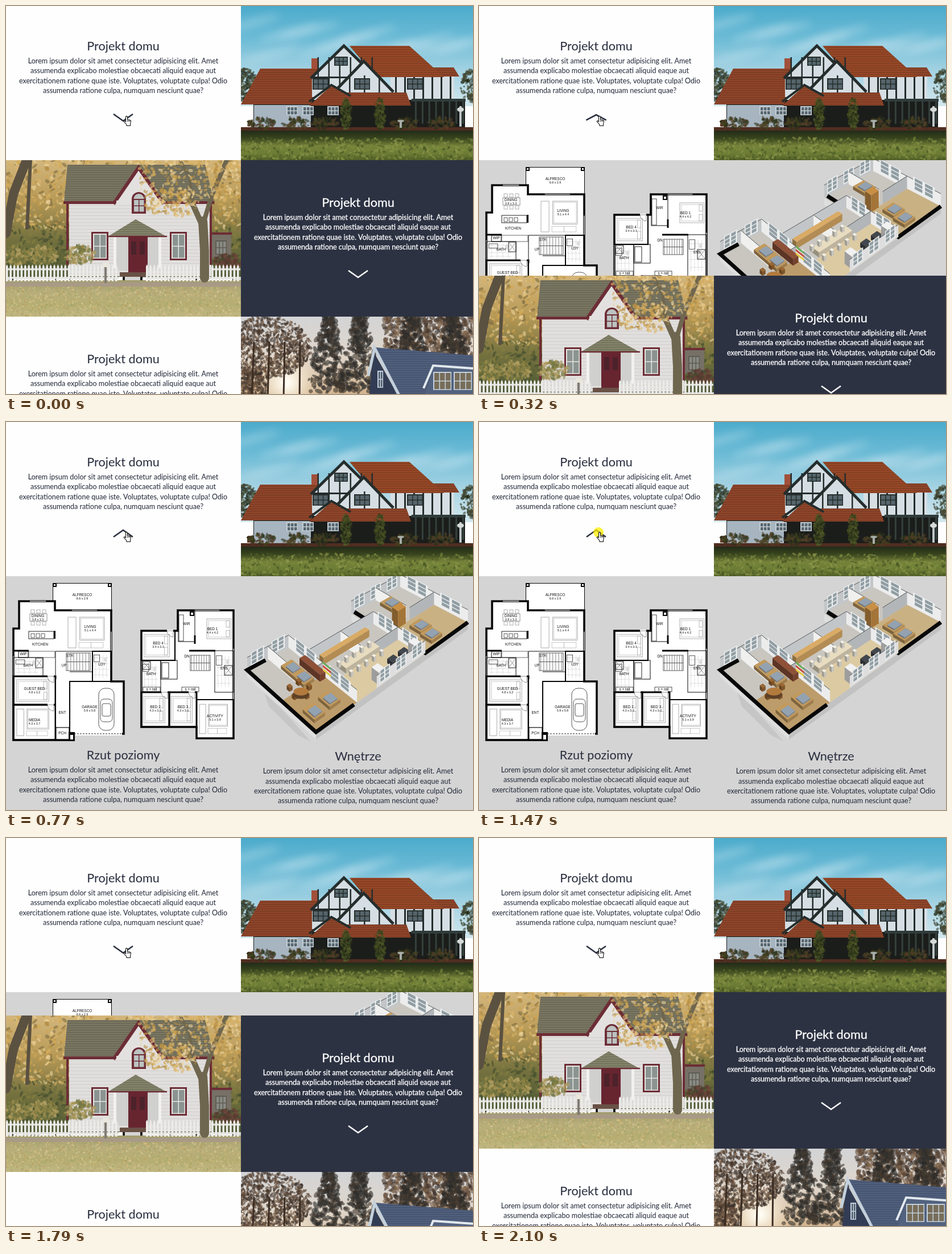
Write an HTML page with a canvas that moves like this. It is 821 by 682 pixels and loops after 2250 ms.

```html
<!DOCTYPE html>
<html lang="pl">
<head>
<meta charset="utf-8">
<title>Projekt domu</title>
<style>
html, body { margin: 0; width: 100%; height: 100%; overflow: hidden; background: #fefefe; }
canvas { display: block; }
</style>
</head>
<body>
<canvas id="stage" width="821" height="682"></canvas>
<script>
const W = 821, SPLIT = 413, TOP = 271, ROW = 275, PANEL = 420;
const INK = '#2b3040', NAVY = '#2c3242', GREY = '#d4d4d4', PAPER = '#fefefe', BLACK = '#080808';
const stage = document.getElementById('stage').getContext('2d');
let g = stage;

// ---- helpers ----
let seed = 7;
const rnd = () => (seed = (seed * 16807) % 2147483647) / 2147483647;
const mix = (a, b, k) => a + (b - a) * k;
const times = (n, f) => { for (let i = 0; i < n; i++) f(i, (i + 0.5) / n); };
const rect = (c, x, y, w, h) => { g.fillStyle = c; g.fillRect(x, y, w, h); };
function trace(p) {
  g.beginPath();
  for (let i = 0; i < p.length; i += 2) g.lineTo(p[i], p[i + 1]);
}
function poly(c, ...p) { trace(p); g.closePath(); g.fillStyle = c; g.fill(); }
function line(c, w, ...p) { trace(p); g.strokeStyle = c; g.lineWidth = w; g.stroke(); }
function box(c, x, y, w, h, lw = 0.8) { g.strokeStyle = c; g.lineWidth = lw; g.strokeRect(x, y, w, h); }
function oval(c, x, y, rx, ry, a = 0) {
  g.beginPath(); g.ellipse(x, y, rx, ry, a, 0, 7); g.fillStyle = c; g.fill();
}
function fade(x, y, w, h, ...stops) {
  const f = g.createLinearGradient(0, y, 0, y + h);
  stops.forEach((c, i) => f.addColorStop(i / (stops.length - 1), c));
  rect(f, x, y, w, h);
}
function within(p, draw) { g.save(); trace(p); g.closePath(); g.clip(); draw(); g.restore(); }

// soft specks spread over a box, or over an oval around a point
function dabs(n, x, y, w, h, size, ...colors) {
  g.globalAlpha = 0.6;
  times(n, i => oval(colors[i % colors.length], x + rnd() * w, y + rnd() * h, size * (0.4 + rnd()), size * (0.3 + rnd() * 0.5), rnd() * 3));
  g.globalAlpha = 1;
}
function clump(n, x, y, rx, ry, size, ...colors) {
  times(n, i => {
    const a = rnd() * 6.3, r = Math.sqrt(rnd());
    dabs(1, x + Math.cos(a) * r * rx, y + Math.sin(a) * r * ry, 0, 0, size, colors[i % colors.length]);
  });
}
function layer(y, h, draw) {
  const c = document.createElement('canvas');
  c.width = W; c.height = h;
  g = c.getContext('2d');
  g.translate(0, -y);
  draw();
  g = stage;
  return c;
}
const photo = (x, y, w, draw) => within([x, y, x + w, y, x + w, y + ROW, x, y + ROW], draw);

// ---- text ----
const LOREM = [
  'Lorem ipsum dolor sit amet consectetur adipisicing elit. Amet',
  'assumenda explicabo molestiae obcaecati aliquid eaque aut',
  'exercitationem ratione quae iste. Voluptates, voluptate culpa! Odio',
  'assumenda ratione culpa, numquam nesciunt quae?'
];
function copy(x, y, title, color, weight = 0.05) {
  g.fillStyle = g.strokeStyle = color;
  g.textAlign = 'center';
  const put = (s, ty) => { g.fillText(s, x, ty); g.lineWidth = weight; g.strokeText(s, x, ty); };
  g.font = '21.6px Lato, "Open Sans", sans-serif';
  put(title, y);
  g.font = '12.55px Lato, "Open Sans", sans-serif';
  LOREM.forEach((s, i) => put(s, y + 23.4 + 17.4 * i));
}
function chevron(x, y, color, turn = 0) {
  const a = turn * Math.PI, k = Math.cos(a), w = 17 * (1 + 0.06 * Math.sin(a));
  line(color, 2.6, x - w, y - 6 * k, x, y + 6 * k, x + w, y - 6 * k);
}

// ---- building parts ----
function roof(c, ...p) {
  within(p, () => {
    rect(c, 0, 0, W, 900);
    times(220, i => rect('rgba(20,15,10,.18)', 0, i * 4, W, 1.4));
  });
}
function gable(c, trim, w, x, y, half, h) {
  poly(c, x, y, x + half, y + h, x - half, y + h);
  line(trim, w, x - half, y + h, x, y, x + half, y + h);
}
function posts(c, x, y, w, h, n, size) {
  times(n, (i, k) => rect(c, x + w * k, y, size, h));
}
function pane(x, y, w, h, frame, glass, cols = 2) {
  rect(frame, x, y, w, h);
  times(cols, i => times(2, j => rect(glass, x + 2 + i * (w - 2) / cols, y + 2 + j * (h - 2) / 2, (w - 2) / cols - 1.5, (h - 2) / 2 - 1.5)));
}
function limb(c, w, ...p) { g.lineCap = 'round'; line(c, w, ...p); g.lineCap = 'butt'; }

// ---- photographs ----
function manor() {
  const dark = '#252d2c', white = '#d5dee3', clay = '#8f452a';
  fade(413, -4, 408, 180, '#4aaacb', '#6bbbd6', '#a5d3e3', '#d3e7ed');
  g.filter = 'blur(8px)';
  times(12, (i, k) => oval('rgba(235,246,250,.4)', 413 + 408 * k, 30 + rnd() * 60, 55, 5, -0.25));
  g.filter = 'none';
  for (const x of [420, 821]) clump(160, x, 140, 22, 30, 4, '#202a1c', '#353d29', '#4b4d33');
  rect('#1b1d1b', 435, 165, 372, 55);
  rect('#a7b5c1', 436, 174, 100, 40);
  rect('#a1503a', 537, 92, 12, 22);
  roof(clay, 447, 110, 562, 110, 536, 173, 413, 173);
  rect(white, 676, 122, 112, 43);
  posts(dark, 676, 124, 112, 42, 7, 3);
  roof(clay, 750, 108, 787, 108, 797, 124, 760, 124);
  roof('#974827', 604, 70, 709, 70, 770, 125, 650, 125);
  rect(white, 538, 126, 114, 34);
  gable(white, dark, 5, 594, 70, 58, 57);
  posts(dark, 538, 90, 114, 57, 6, 2.5);
  rect(dark, 540, 124, 60, 3);
  gable(white, dark, 5, 629, 97, 52, 54);
  posts(dark, 590, 122, 78, 30, 3, 2.5);
  pane(577, 89, 24, 16, dark, '#56686e', 3);
  for (const x of [539, 612, 705]) pane(x, 127, 28, 20, dark, '#56656b', 3);
  roof(clay, 572, 140, 598, 152, 704, 152, 712, 175, 533, 175);
  line(dark, 4, 533, 168, 572, 139, 606, 158);
  rect('#303b3b', 713, 163, 95, 5);
  posts('#35413d', 713, 167, 95, 40, 8, 3);
  for (const x of [493, 521, 565]) pane(x, 176, 20, 16, '#c3cdd3', '#56656e', 3);
  rect('#4f2d20', 413, 213, 408, 6);
  for (const x of [450, 510, 560, 700, 765]) clump(60, x, 206, 24, 10, 4, '#2a321c', '#45431f', '#57402a');
  for (const x of [598, 658]) clump(170, x, 190, 9, 28, 3, '#3f4a20', '#555b2b', '#2b3519');
  rect('#bcc5c6', 797, 176, 4, 36); oval('#d5dad9', 799, 182, 6, 4);
  oval('#a8aea8', 694, 202, 6, 2); rect('#a8aea8', 692, 203, 4, 11);
  fade(413, 219, 408, 54, '#222b18', '#38441d', '#75833a', '#6c7c34', '#4c5a25');
  dabs(500, 413, 232, 408, 38, 3, '#7f8d40', '#435223', '#90994c');
}

function cottage() {
  const red = '#6d2d36', leaf = ['#d2a650', '#dcb66a', '#b48d45', '#ecd49c'];
  const wood = '#6f664f', shade = ['#4c5732', '#6a6d40', '#37442c', '#85803f'];
  fade(0, 271, 413, 205, '#d3b67c', '#b99b58', '#76723f', '#4b5733');
  dabs(900, 0, 271, 413, 120, 4, ...leaf, '#7b6b40');
  dabs(500, 0, 385, 413, 75, 4, ...shade);
  limb('#5b5141', 16, 0, 400, 13, 330, 36, 271);
  limb('#5b5141', 6, 37, 390, 43, 271);
  rect('#e1dfdd', 111, 345, 250, 130);
  times(21, i => rect('#cecccb', 111, 350 + i * 6, 250, 0.8));
  roof('#7a7763', 108, 279, 350, 279, 366, 346, 102, 346);
  rect(red, 101, 343, 265, 5);
  for (const x of [106, 358]) rect(red, x, 347, 4, 108);
  gable('#e3e1df', red, 6, 233, 284, 44, 64);
  rect('#e3e1df', 194, 342, 78, 8);
  oval(red, 233.5, 339, 12.5, 12); rect(red, 221, 339, 25, 26);
  oval('#bcc3c1', 233.5, 339, 9, 9); pane(223, 339, 21, 24, red, '#bcc3c1');
  for (const x of [150, 288]) { rect(red, x, 397, 30, 50); pane(x + 3, 400, 24, 44, '#e4e4e1', '#8b9491'); }
  rect('#d0d0cf', 190, 406, 82, 58);
  for (const x of [189, 268]) rect('#f2f1ee', x, 406, 5, 58);
  roof('#83846a', 228, 375, 280, 404, 181, 404);
  line(red, 2.5, 179, 405, 283, 405);
  rect('#672530', 215, 405, 34, 63);
  for (const x of [220, 235]) rect('#4c222b', x, 414, 9, 23);
  rect('#6a5146', 200, 468, 47, 8);
  rect('#767066', 362, 400, 34, 43);
  rect(red, 362, 398, 35, 4); pane(368, 412, 20, 25, '#5f5b54', '#888b84', 3);
  for (const x of [18, 65, 131]) clump(130, x, 438, 26, 17, 4, '#a18d4c', '#8a8246', '#b8a365', '#6a713f');
  clump(110, 390, 448, 25, 12, 4, '#5b3732', '#70413b', '#45472f');
  fade(0, 482, 413, 64, '#a19a6c', '#b8ae7c', '#b5ad73', '#c0b682');
  rect('#a89a87', 0, 486, 413, 7);
  dabs(1100, 0, 493, 413, 54, 2, '#d3bd7c', '#9ba364', '#dccb95', '#b89d5b');
  for (const [a, b] of [[0, 198], [246, 412]]) {
    for (const y of [461, 476]) rect('#d9dad6', a, y, b - a, 3.5);
    for (let x = a; x < b; x += 6.4) poly('#ecebe8', x, 484, x, 458, x + 1.8, 454, x + 3.6, 458, x + 3.6, 484);
  }
  rect('#7f7b73', 173, 459, 4, 28); rect('#e9e6dc', 170, 451, 11, 8);
  limb(wood, 16, 349, 478, 349, 430, 346, 378);
  limb(wood, 10, 346, 388, 329, 350, 306, 323);
  limb(wood, 8, 347, 382, 361, 335, 388, 271);
  limb(wood, 5, 330, 350, 322, 300, 306, 271);
  dabs(230, 235, 271, 178, 65, 4, ...leaf);
  clump(140, 294, 345, 52, 26, 4, ...leaf);
}

function lodge() {
  const frost = '#c3d0dc', bark = ['#46372c', '#5c4838', '#755a44', '#352d28'];
  fade(413, 546, 408, 136, '#d3d4d6', '#dfd6cb', '#d2b48f');
  const glow = g.createRadialGradient(493, 662, 4, 493, 662, 60);
  glow.addColorStop(0, '#fffdf3'); glow.addColorStop(1, 'rgba(250,235,205,0)');
  rect(glow, 413, 546, 150, 136);
  clump(1000, 460, 600, 76, 54, 3.5, ...bark);
  dabs(200, 413, 640, 45, 50, 4, ...bark);
  dabs(600, 665, 546, 156, 70, 5, ...bark, '#86694d');
  times(4, i => line('#3b2d23', 3, 432 + i * 28, 690, 436 + i * 27, 590));
  for (const x of [567, 622, 714, 785]) times(28, i => {
    const y = 540 + i * 5, r = 10 + i * 1.1;
    clump(9, x, y, r, 6, 6, '#2a2a28', '#34322e', '#42392f');
  });
  poly('#323d55', 646, 607, 692, 690, 638, 690);
  roof('#50607f', 648, 600, 821, 614, 821, 690, 694, 690);
  line(frost, 5, 637, 650, 648, 601, 694, 690);
  pane(653, 641, 10, 30, frost, '#4b5969');
  poly('#53637f', 754, 630, 821, 634, 821, 690, 734, 690);
  for (const x of [751, 787]) pane(x, 643, 32, 32, frost, '#776d59', 3);
  line('#e3e9ee', 4, 734, 672, 751, 632, 821, 637);
}

// ---- floor plan ----
function tag(name, x, y, dim) {
  g.textAlign = 'center'; g.fillStyle = '#111';
  const put = (s, size, dy) => { g.font = size + 'px "Liberation Sans", Arial, sans-serif'; g.fillText(s, x, y + 2 + dy); };
  put(name, 6.4, 0);
  if (dim) put(dim, 5.4, 6);
}
// outer walls; every long side gets a window
function shell(...p) {
  poly('#fff', ...p);
  const q = [...p, p[0], p[1]];
  line(BLACK, 3.6, ...q, p[2], p[3]);
  for (let i = 0; i < p.length; i += 2) {
    const [x, y, u, v] = q.slice(i, i + 4);
    if (Math.hypot(u - x, v - y) > 55) line('#fff', 1.2, mix(x, u, 0.3), mix(y, v, 0.3), mix(x, u, 0.75), mix(y, v, 0.75));
  }
}
const furnish = {
  bed(x, y, w, h) {
    box('#999', x, y, w, h); box('#bbb', x + 3, y + 3, w - 6, h - 6);
    times(2, i => box('#aaa', x + w - 9, y + 3 + i * h / 2, 6, h / 2 - 6));
  },
  sofa(x, y, w, h) {
    box('#999', x, y, w * 0.22, h); box('#999', x + w * 0.32, y, w * 0.68, h * 0.75); box('#bbb', x + w * 0.35, y + 2, w * 0.62, h * 0.75 - 4);
    times(2, i => box('#bbb', x + w * 0.3 + i * w / 3, y + h * 0.82, w / 3, h * 0.18));
  },
  tiles(x, y, w, h) {
    times(4, (i, k) => { line('#ccc', 0.6, x, y + h * k, x + w, y + h * k); line('#ccc', 0.6, x + w * k, y, x + w * k, y + h); });
    box('#333', x, y, w * 0.4, h * 0.3); oval('#ddd', x + w * 0.8, y + h * 0.2, 3, 4);
  },
  stairs(x, y, w, h) {
    box('#333', x, y, w, h); line('#333', 0.8, x, y + h / 2, x + w, y + h / 2);
    times(8, (i, k) => line('#555', 0.7, x + w * k, y, x + w * k, y + h));
  },
  table(x, y, w, h) {
    box('#777', x, y, w, h);
    times(3, (i, k) => { for (const dy of [-7, h + 1]) box('#999', x + w * k - 3, y + dy, 6, 6); });
  },
  cross(x, y, w, h) { box('#222', x, y, w, h, 1); line('#666', 0.7, x, y, x + w, y + h); line('#666', 0.7, x + w, y, x, y + h); }
};
function room(x, y, w, h, name, dim, kind, wall = 3) {
  box(BLACK, x, y, w, h, wall);
  if (kind) furnish[kind](x + w * 0.08, y + h * 0.12, w * 0.76, h * 0.76);
  if (wall > 2) {
    rect('#fff', x + w - 14, y - 2, 11, 4);
    g.beginPath(); g.moveTo(x + w - 3, y); g.arc(x + w - 3, y, 11, Math.PI / 2, Math.PI); g.closePath();
    g.strokeStyle = '#666'; g.lineWidth = 0.7; g.stroke();
  }
  if (name) tag(name, x + w / 2, y + h * 0.43, dim);
}
const closet = (x, y) => { box('#222', x, y, 30, 8); tag('s + rail', x + 15, y + 4); };

function groundFloor() {
  rect('#fff', 82, 283, 104, 50);
  room(82.5, 283.5, 103, 47, 'ALFRESCO', '6.6 x 2.9', '', 1);
  for (const x of [82, 179]) { rect(BLACK, x, 283, 7, 7); rect('#fff', x + 2, 285, 3, 3); }
  shell(23, 315, 86, 315, 86, 331, 185, 331, 185, 456, 207, 456, 207, 548, 112, 548, 112, 559, 13, 559, 13, 363, 23, 363);
  furnish.table(42, 337, 30, 13); tag('DINING', 56, 341, '3.8 x 3.3');
  furnish.sofa(109, 343, 64, 54); tag('LIVING', 148, 360, '5.1 x 4.4');
  box('#222', 40, 368, 44, 13, 1); rect(BLACK, 84, 367, 3, 14);
  times(3, i => box('#333', 44 + i * 9, 372, 6, 7));
  tag('KITCHEN', 60, 391);
  room(22, 403, 17, 11, 'WIP', '', '', 1);
  room(13, 414, 52, 33, 'BATH', '', 'tiles', 1);
  furnish.cross(52, 415, 13, 17);
  line(BLACK, 3, 13, 402, 40, 402);
  box('#444', 40, 403, 46, 11);
  line(BLACK, 1, 87, 447, 87, 403, 152, 403, 152, 439, 112, 439);
  furnish.stairs(106, 406, 42, 31); tag('STR', 112, 411); tag('UP', 102, 428);
  room(152, 403, 33, 53, 'LDY', '', 'tiles', 2);
  room(13, 447, 74, 50, 'GUEST BED', '4.8 x 3.2', 'bed');
  room(13, 497, 74, 62, 'MEDIA', '4.3 x 3.7', 'sofa');
  rect('#fff', 88, 452, 22, 84); tag('ENT', 99, 511);
  room(87, 537, 24, 23, 'PCH', '', '', 1.2);
  room(112, 456, 95, 92, '', '', '', 2);
  rect('#fff', 120, 545, 84, 6);
  times(17, i => rect('#222', 120 + i * 5, 547.5, 3, 1));
  rect(BLACK, 110, 545, 11, 16); rect('#fff', 113, 550, 5, 8);
  for (const [x, y, w, h, r] of [[163, 468, 27, 74, 11], [166, 487, 21, 40, 6], [169, 495, 15, 22, 3]]) {
    g.beginPath(); g.roundRect(x, y, w, h, r); g.strokeStyle = '#555'; g.lineWidth = 1; g.stroke();
  }
  tag('GARAGE', 147, 501, '5.9 x 5.8');
}
function upperFloor() {
  shell(302, 331, 400, 331, 400, 556, 335, 556, 335, 536, 238, 536, 238, 367, 302, 367);
  room(303, 332, 29, 54, 'WIR', '', '', 1);
  rect(BLACK, 323, 333, 8, 8); rect('#fff', 325, 335, 4, 4);
  box('#222', 304, 339, 8, 46);
  line(BLACK, 3, 332, 375, 332, 390); line(BLACK, 3, 322, 402, 368, 402);
  furnish.bed(353, 346, 43, 35); tag('BED 1', 363, 364, '4.4 x 4.2');
  room(238, 367, 59, 52, 'BED 4', '3.4 x 3.3', 'bed', 2.2);
  furnish.stairs(324, 410, 35, 27); tag('DN', 318, 412);
  room(238, 419, 34, 56, 'BATH', '', 'tiles', 1);
  furnish.cross(240, 421, 14, 14);
  room(272, 419, 29, 33, '', '', '', 1); box('#222', 274, 423, 12, 27, 1);
  room(367, 402, 33, 73, 'ENS', '', 'tiles', 1);
  furnish.cross(384, 428, 14, 17);
  for (const x of [241, 309]) closet(x, 466);
  room(238, 475, 49, 61, 'BED 2', '4.3 x 3.0', 'bed');
  room(287, 475, 48, 61, 'BED 3', '4.3 x 3.0', 'bed');
  room(335, 488, 65, 68, 'ACTIVITY', '5.1 x 3.9', 'sofa', 2);
}

// ---- cutaway model: u runs across the house, v along it, z is up ----
const spot = (u, v, z = 0) => [
  mix(mix(424, 545, u), mix(693, 812, u), v),
  mix(mix(436, 545, u), mix(290, 352, u), v) - z
];
const slab = (c, u, v, du, dv, z = 0) =>
  poly(c, ...spot(u, v, z), ...spot(u + du, v, z), ...spot(u + du, v + dv, z), ...spot(u, v + dv, z));
const upright = (c, u, v, a, b, z, top) =>
  poly(c, ...spot(u, v, z), ...spot(a, b, z), ...spot(a, b, top), ...spot(u, v, top));
function cube(c, u, v, du, dv, h, z = 0) {
  slab(c, u, v, du, dv, z + h);
  for (const [shade, a, b] of [['rgba(0,0,0,.35)', u, v], ['rgba(0,0,0,.18)', u + du, v + dv]])
    for (const tone of [c, shade]) upright(tone, a, b, u + du, v, z, z + h);
}
function wall(c, u, v, a, b, windows = 0) {
  upright(c, u, v, a, b, 0, 22);
  line('#55585a', 1, ...spot(u, v, 22), ...spot(a, b, 22));
  const at = k => [mix(u, a, k), mix(v, b, k)];
  times(windows, (i, k) => {
    const r = 0.32 / windows;
    upright('#eceeee', ...at(k - r), ...at(k + r), 4, 27);
    times(2, m => times(3, n => {
      const left = k - r * (0.85 - m * 0.95);
      upright('#909da3', ...at(left), ...at(left + r * 0.7), 6 + n * 7, 11.5 + n * 7);
    }));
  });
}
function bedstead(u, v) { cube('#c29a5e', u, v, 0.17, 0.07, 6); cube('#93a2b1', u + 0.05, v + 0.01, 0.1, 0.05, 2, 6); }

function wing(u0, v0, v1, floor, windows) {
  const mid = (v0 + v1) / 2, cut = (u0 + 1) / 2;
  upright('#dedede', u0, v0, 1, v0, -13, 0);
  upright('#c2c2c2', 1, v0, 1, v1, -13, 0);
  slab('#c9c6c0', u0, v0, 1 - u0, v1 - v0);
  slab(floor, cut, v0, 1 - cut, v1 - v0);
  wall('#c3c6c8', u0, v0, u0, v1, windows);
  wall('#ececec', u0, v1, 1, v1, 2);
  wall('#b3b6b8', cut, mid, cut, v1);
  wall('#f0f0ef', u0, mid, cut * 0.9, mid);
}
const curb = (...p) => line(BLACK, 7, ...p);

function interior() {
  poly('#c6c6c6', 451, 466, 535, 561, 514, 551, 462, 500);
  wing(0, 0.68, 1, '#c9b184', 3);
  for (const u of [0.1, 0.6, 0.78]) bedstead(u, 0.83 - u * 0.06);
  cube('#c98f45', 0.42, 0.76, 0.09, 0.05, 30);
  curb(...spot(0, 0.7), ...spot(0.2, 0.7)); curb(...spot(0.85, 0.72), ...spot(1, 0.72), ...spot(1, 1));
  wing(0.28, 0.27, 0.7, '#dccaa2', 0);
  cube('#d9ab66', 0.34, 0.32, 0.06, 0.3, 12);
  cube('#e8dcc0', 0.54, 0.36, 0.1, 0.22, 9);
  times(5, i => { for (const u of [0.5, 0.68]) cube('#f3efe4', u, 0.56 - i * 0.05, 0.035, 0.015, 9); });
  for (const v of [0.62, 0.55]) cube('#42484d', 0.82, v, 0.08, 0.04, 8);
  for (const v of [0.66, 0.42]) cube('#f1f1f1', 0.88, v, 0.1, 0.04, 22);
  wall('#dedede', 1, 0.4, 1, 0.72, 3);
  wing(0, 0, 0.27, '#bd9c6b', 2);
  cube('#8f5138', 0.25, 0.23, 0.3, 0.035, 12);
  times(3, i => upright(['#e1c943', '#c54d42', '#69a95d'][i], 0.5, 0.27, 0.62, 0.27, 8 + i * 6, 12 + i * 6));
  for (const u of [0.18, 0.34, 0.72]) bedstead(u, 0.14);
  bedstead(0.74, 0.03);
  const [x, y] = spot(0.56, 0.1);
  times(5, i => cube('#9a6632', 0.5 + 0.1 * Math.cos(i * 1.26), 0.1 + 0.05 * Math.sin(i * 1.26), 0.04, 0.02, 7));
  oval('#5d4027', x, y - 1, 14, 8); oval('#b37a3d', x, y - 6, 13, 7);
  curb(...spot(0, 0.12), ...spot(0, 0), ...spot(1, 0), ...spot(1, 0.25));
}

// ---- page parts ----
const first = layer(-4, ROW, () => {
  rect(PAPER, 0, -4, SPLIT, ROW);
  photo(SPLIT, -4, W - SPLIT, manor);
  copy(206, 77.5, 'Projekt domu', INK);
});
const second = layer(TOP, ROW, () => {
  rect(NAVY, SPLIT, TOP, W - SPLIT, ROW);
  photo(0, TOP, SPLIT, cottage);
  copy(619, 352.5, 'Projekt domu', '#fff', 0.3);
  chevron(619, 471, '#fff');
});
const third = layer(546, ROW, () => {
  rect(PAPER, 0, 546, SPLIT, ROW);
  photo(SPLIT, 546, W - SPLIT, lodge);
  copy(206, 627.5, 'Projekt domu', INK);
});
const panel = layer(TOP, PANEL, () => {
  rect(GREY, 0, TOP, W, PANEL);
  groundFloor();
  upperFloor();
  interior();
  copy(206, 592.5, 'Rzut poziomy', INK);
  copy(619, 594.8, 'Wnętrze', INK);
});

function hand() {
  const p = new Path2D('M4 2 Q5.5 .2 7 2 V7 L11.5 8 Q13.2 8.5 13 10.5 L12 15 V18 H5.5 V16 L1 11 Q.2 9.3 2 9.2 L4 10.8 Z');
  g.save();
  g.translate(206.5, 192.5);
  g.fillStyle = '#fff'; g.fill(p);
  g.strokeStyle = '#111'; g.lineWidth = 1.1; g.stroke(p);
  times(3, i => line('#111', 0.8, 7 + i * 2, 8, 7 + i * 2, 11));
  g.restore();
}

// ---- motion ----
const LOOP = 2250, STEP = 80, OPEN = 150, CLOSE = 1470;
// the CSS "ease" curve
function ease(x) {
  if (x <= 0) return 0;
  if (x >= 1) return 1;
  const bez = (s, a, b) => 3 * s * (1 - s) * ((1 - s) * a + s * b) + s * s * s;
  let lo = 0, hi = 1;
  times(20, () => {
    const m = (lo + hi) / 2;
    if (bez(m, 0.25, 0.25) < x) lo = m; else hi = m;
  });
  return bez(lo, 0.1, 1);
}
const opened = (t, d) => t < CLOSE ? ease((t - 214) / d) : 1 - ease((t - 1556) / d);

function frame(now) {
  const clock = now % LOOP;
  const phase = clock < CLOSE ? 0 : 30;
  const t = phase + STEP * Math.floor((clock - phase + 5) / STEP);
  const shift = Math.round(PANEL * opened(t, 372.5));
  g.drawImage(panel, 0, TOP);
  g.drawImage(first, 0, -4);
  g.drawImage(second, 0, TOP + shift);
  g.drawImage(third, 0, TOP + ROW + shift);
  chevron(206, 196, INK, opened(t, 220));
  const pressed = (clock >= OPEN && clock < OPEN + 90) || (clock >= CLOSE && clock < CLOSE + 150);
  if (pressed) oval('rgba(255,238,0,.75)', 210, 194, 9, 9);
  hand();
}
const start = performance.now();
(function loop() {
  frame(performance.now() - start);
  requestAnimationFrame(loop);
})();
</script>
</body>
</html>
```
